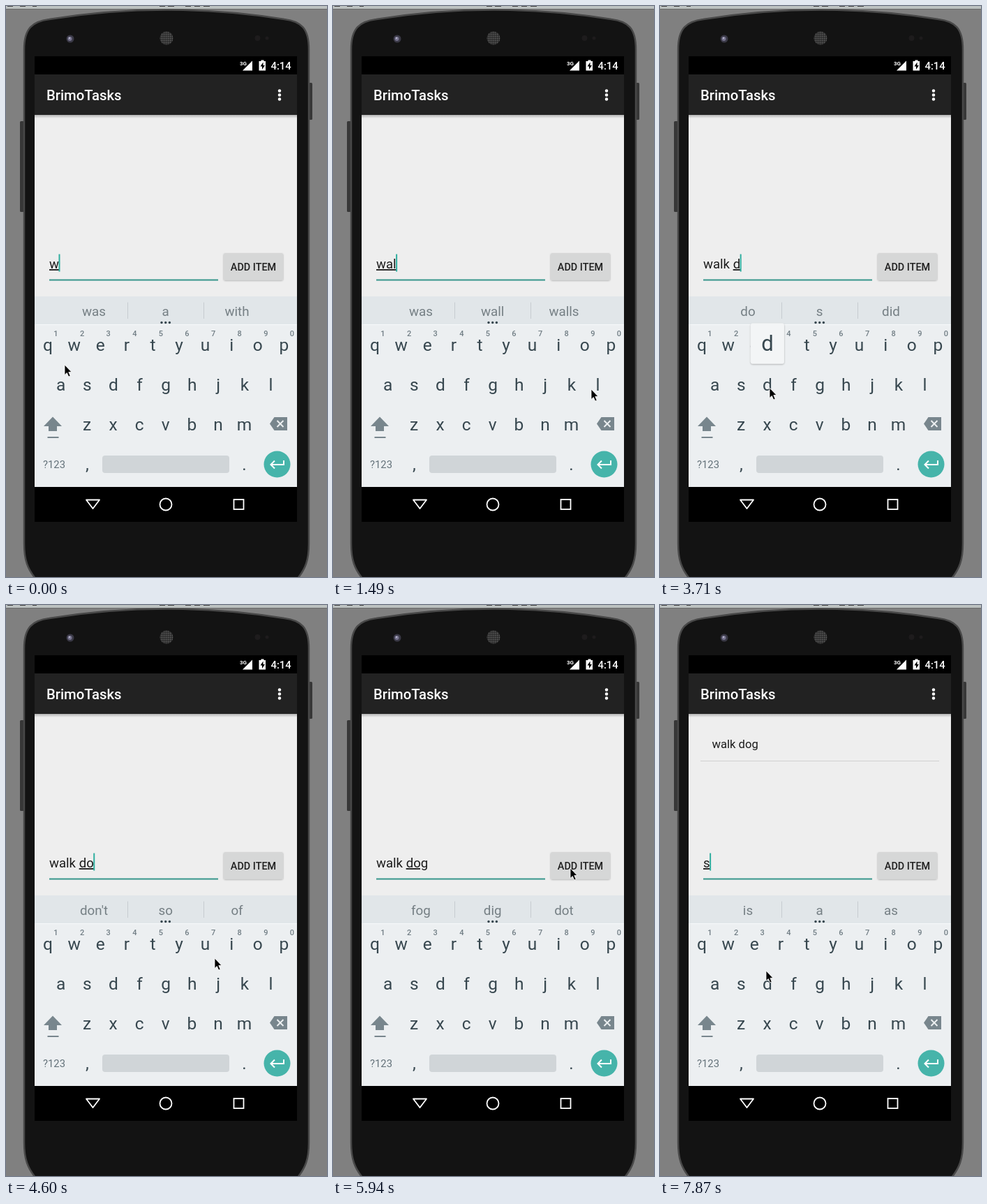
An HTML page that plays this animation: 460x818 px, repeating every 8 s.

```html
<!DOCTYPE html>
<html lang="en">
<head>
<meta charset="utf-8">
<title>To-do demo</title>
<style>
html, body { margin: 0; width: 100%; height: 100%; overflow: hidden; background: #808080; }
svg { display: block; width: 460px; height: 818px; font-family: Roboto, sans-serif; }
text { white-space: pre; }
.mid { text-anchor: middle; }
.key { font-size: 24.5px; fill: #37474f; }
.num { font-size: 11px; font-weight: 500; fill: #707d84; }
.word { font-size: 18.8px; fill: #757f84; }
</style>
</head>
<body>
<svg viewBox="0 0 460 818">
  <defs>
    <linearGradient id="shade" x2="0" y2="1">
      <stop stop-color="#b4b4b4"/><stop offset="1" stop-color="#eee"/>
    </linearGradient>
    <pattern id="mesh" width="3" height="3" patternUnits="userSpaceOnUse">
      <rect width="3" height="3" fill="#2b2b2b"/><circle cx="1.5" cy="1.5" r="1" fill="#5c5c5c"/>
    </pattern>
    <filter id="soft" x="-20%" y="-20%" width="140%" height="150%">
      <feDropShadow dx="0" dy="1" stdDeviation="1.2" flood-opacity=".3"/>
    </filter>
  </defs>

  <!-- Desktop and phone body -->
  <rect width="460" height="818" fill="#808080"/>
  <rect width="460" height="4" fill="#bcc1c0"/>
  <rect y="4" width="460" height="1" fill="#6b6b6b"/>
  <path d="M2 0h8M20 0h8M38 0h6M220 0h8M232 0h9M257 0h8M270 0h8M283 0h9" stroke="#444" stroke-width="2"/>
  <rect x="20" y="165" width="6" height="130" rx="1.5" fill="#373737"/>
  <rect x="434" y="110" width="5" height="53" rx="1.5" fill="#373737"/>
  <path d="M26 62C26 32 38 22 62 19Q230 -8 399 19C423 22 434 32 434 62V770C434 794 429 806 418 820H42C31 806 26 794 26 770Z"
    fill="#131313" stroke="#484848" stroke-width="2.5"/>
  <circle cx="92" cy="47" r="5.5" fill="#3a3946"/>
  <circle cx="91.5" cy="47" r="3" fill="#77748f"/>
  <circle cx="91" cy="46" r="1.2" fill="#b6b4ca"/>
  <circle cx="230" cy="46" r="9.5" fill="url(#mesh)"/>
  <circle cx="360.500" cy="46" r="4" fill="#1e1c1d"/>
  <circle cx="374" cy="46" r="2.500" fill="#1e1c1d"/>

  <!-- Status and app bars -->
  <rect x="41" y="72" width="376" height="667"/>
  <g fill="#fff">
    <text x="335" y="85" font-size="8" font-weight="700">3G</text>
    <path d="M339 92.500H353V78.500Z"/>
    <path d="M365.500 77.500h4v1.500h2.500v13.500h-9.500V79h3z"/>
    <path d="M368.500 80.500l-4 6h2.500v4.500l4-6h-2.500z" fill="#000"/>
    <text x="379.500" y="91" font-size="14.8" font-weight="500">4:14</text>
  </g>
  <rect x="41" y="98" width="376" height="58" fill="#222"/>
  <g fill="#fff">
    <text x="58" y="135" font-size="20.3" font-weight="500">BrimoTasks</text>
    <circle cx="392" cy="121.500" r="2.200"/><circle cx="392" cy="127.500" r="2.200"/><circle cx="392" cy="133.500" r="2.200"/>
  </g>

  <!-- Content -->
  <rect x="41" y="156" width="376" height="260" fill="#eee"/>
  <rect x="41" y="156" width="376" height="5" fill="url(#shade)"/>
  <g id="item">
    <text x="74.500" y="204.500" font-size="16.6" fill="#1c1c1c">walk dog</text>
    <path d="M58 223.500H400" stroke="#d0d0d0"/>
  </g>
  <text id="hint" x="62" y="376" font-size="18.6" fill="#777">Enter a new item</text>
  <text id="field" x="62" y="376" font-size="18.6" fill="#1c1c1c"><tspan id="done"></tspan><tspan id="typing" text-decoration="underline"></tspan></text>
  <rect id="caret" y="355.500" width="2" height="25" fill="#2fae9f"/>
  <rect x="62" y="391.500" width="242" height="2" fill="#37968b"/>
  <rect id="button" x="312" y="354" width="85" height="38.500" rx="2" filter="url(#soft)"/>
  <text class="mid" x="354.500" y="378.500" font-size="14.4" font-weight="500" fill="#1f1f1f">ADD ITEM</text>

  <!-- Keyboard -->
  <rect x="41" y="416" width="376" height="40" fill="#e1e6e9"/>
  <rect x="41" y="456" width="376" height="233" fill="#eceff1"/>
  <rect x="41" y="456" width="376" height="1" fill="#f7f9fa"/>
  <path id="bars" d="M174.500 424.500V448M283.500 424.500V448" stroke="#c6ccd0"/>
  <g id="words"></g>
  <g id="dots" fill="#37474f">
    <circle cx="223" cy="453.500" r="1.700"/><circle cx="228.700" cy="453.500" r="1.700"/><circle cx="234.400" cy="453.500" r="1.700"/>
  </g>
  <g id="keys"></g>
  <g fill="#78868d">
    <path d="M67 588.500L80 602H73V609H61V602H54ZM59.500 617H75.500V619H59.500Z"/>
    <path d="M378 598.500L384.500 589H403V608H384.500Z"/>
  </g>
  <path d="M388.500 594l9 9M397.500 594l-9 9" stroke="#eceff1" stroke-width="2"/>
  <text class="mid" x="69" y="662" font-size="14.8" fill="#64727a">?123</text>
  <rect id="space" x="138" y="644" width="182" height="25" rx="4"/>
  <circle cx="388.500" cy="656.500" r="19" fill="#46b4aa"/>
  <path d="M398 651V657H380M385 651.500L379.500 657L385 662.500" fill="none" stroke="#fff" stroke-width="2"/>

  <!-- Navigation bar -->
  <g fill="none" stroke="#fff" stroke-width="1.800">
    <path d="M115 707.500H134L124.500 720Z" stroke-linejoin="round"/>
    <circle cx="229" cy="714" r="8.500"/>
    <rect x="326.500" y="707" width="14" height="14"/>
  </g>

  <g id="popup">
    <rect x="-24" y="-88" width="48" height="58" rx="3" fill="#f3f5f6" filter="url(#soft)"/>
    <text class="mid" y="-49" font-size="31" fill="#37474f"></text>
  </g>
  <path id="pointer" d="M0 0V14.500L3.300 11.500L5.700 17L8.200 16L5.800 10.500H10Z" stroke="#fff" stroke-width=".8"/>
</svg>
<script>
const LOOP = 8000, STEP = 148.5;
const $ = id => document.getElementById(id);
const show = (id, on) => $(id).style.display = on ? '' : 'none';

function label(parent, cls, x, y, str) {
  const el = document.createElementNS('http://www.w3.org/2000/svg', 'text');
  el.setAttribute('class', 'mid ' + cls);
  el.setAttribute('x', x);
  el.setAttribute('y', y);
  el.textContent = str;
  parent.append(el);
  return el;
}

const keyAt = {};
[['qwertyuiop', 60, 493.5], ['asdfghjkl', 78.7, 550.5], ['zxcvbnm', 116, 608]].forEach(([row, x0, y], r) => {
  [...row].forEach((ch, i) => {
    const x = x0 + i * 37.6;
    keyAt[ch] = [x, y - 8];
    label($('keys'), 'key', x, y, ch);
    if (!r) label($('keys'), 'num', x + 11.5, 472.5, (i + 1) % 10);
  });
});
label($('keys'), 'key', 116.5, 665, ',');
label($('keys'), 'key', 341.5, 665, '.');
const words = [126, 228.7, 331].map(x => label($('words'), 'word', x, 444, ''));

// Step, finished text, word being typed, suggestions, key pressed
const edits = [
  [0, '', 'w', 'was a with'],
  [3, '', 'wa', 'was way want', 'a'],
  [9, '', 'wal', 'was wall walls', 'l'],
  [12, '', 'walk', 'talk walk walking', 'k'],
  [19, 'walk ', '', ''],
  [25, 'walk ', 'd', 'do s did', 'd'],
  [29, 'walk ', 'do', "don't so of", 'o'],
  [34, 'walk ', 'dog', 'fog dig dot', 'g'],
  [41, '', '', 'walk'],
  [51, '', 's', 'is a as', 's']
];

// Step, x, y of the pointer tip
const path = [
  [0, 84, 514], [2, 75, 544], [4, 77, 547], [8, 367, 551], [10, 370, 549],
  [12, 338, 548], [13, 338, 548], [16, 284, 645], [17, 270, 652], [18, 270, 652],
  [19, 220, 606], [23, 155, 545], [25, 157, 547], [28, 357, 492], [29, 357, 492],
  [31, 299, 506], [33, 236, 549], [34, 234, 551], [40, 340, 377], [42, 340, 377],
  [46, 179, 491], [50, 118, 538], [51, 118, 551], [53, 152, 524], [54, 152, 524]
];

function pointerAt(k) {
  const i = Math.max(1, path.findIndex(p => p[0] >= k));
  const [a, b] = [path[i - 1], path[i]];
  const u = (k - a[0]) / (b[0] - a[0]);
  return [a[1] + (b[1] - a[1]) * u, a[2] + (b[2] - a[2]) * u];
}

function draw(time) {
  const k = Math.min(53, Math.floor((time % LOOP + 10) / STEP));
  const [start, done, typing, list, key] = edits.findLast(e => e[0] <= k);
  const options = list.split(' ');
  const single = options.length === 1;

  $('done').textContent = done;
  $('typing').textContent = typing;
  show('hint', !done && !typing);
  const end = done || typing ? $('field').getComputedTextLength() : 0;
  $('caret').setAttribute('x', 61.5 + end);
  show('caret', (k - start) * STEP % 1000 < 500);

  words.forEach((w, i) => w.textContent = single ? (i === 1 ? list : '') : options[i]);
  show('dots', !single);
  show('bars', !single || !list);
  show('item', k >= 41);
  $('button').setAttribute('fill', k === 41 || k === 42 ? '#c3c4c4' : '#d6d7d7');
  $('space').setAttribute('fill', k >= 16 && k < 19 ? '#b9c0c4' : '#d0d5d8');

  const pressed = key && k === start;
  show('popup', pressed);
  if (pressed) {
    $('popup').setAttribute('transform', `translate(${keyAt[key]})`);
    $('popup').lastElementChild.textContent = key;
  }
  $('pointer').setAttribute('transform', `translate(${pointerAt(k)})`);
}

let origin;
function tick(now) {
  origin ??= now;
  draw(now - origin);
  requestAnimationFrame(tick);
}
draw(0);
requestAnimationFrame(tick);
</script>
</body>
</html>
```
